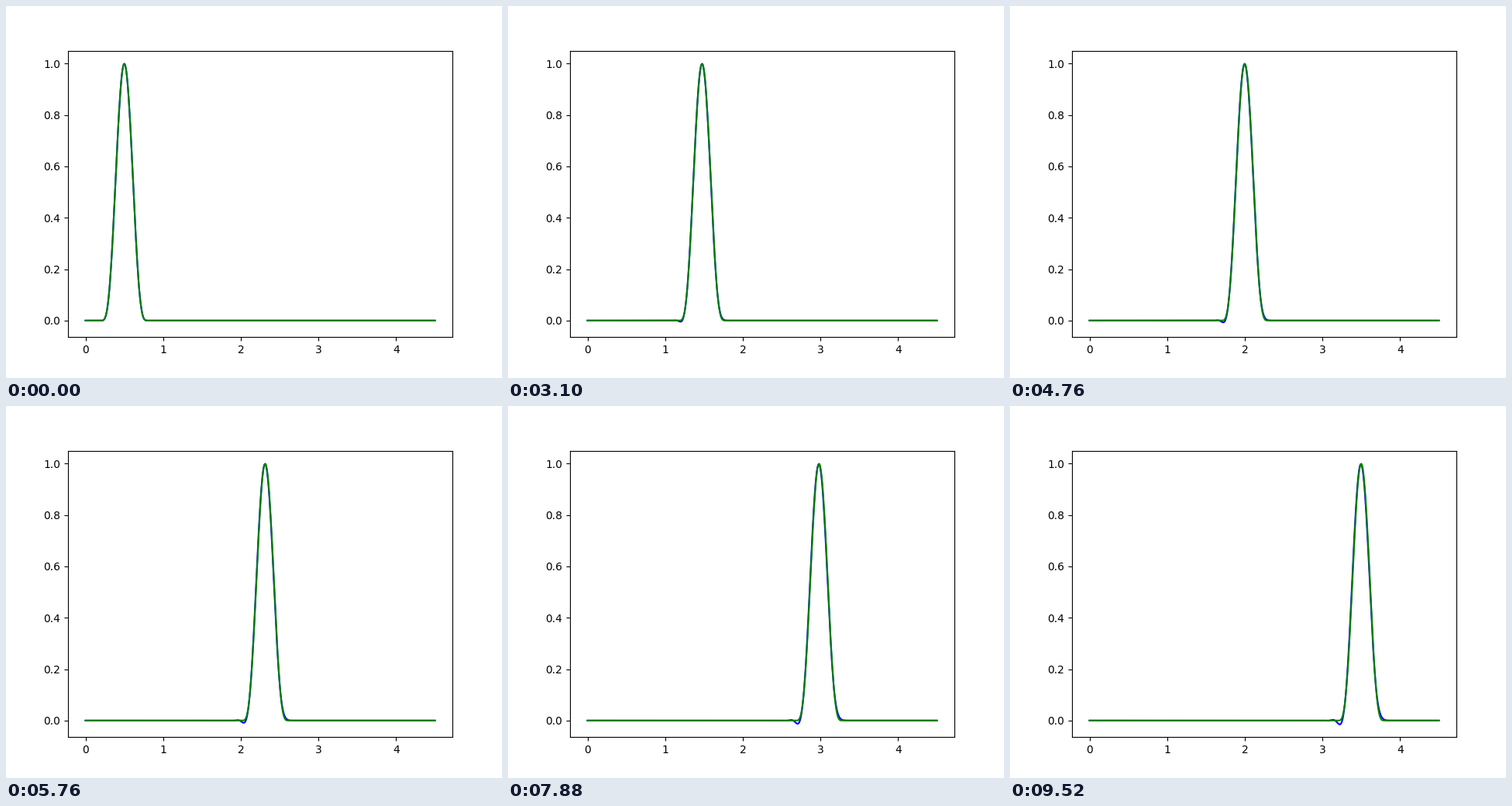
Recreate the animation shown at these times as a matplotlib script. Size 640 px wide and 480 px high, loop 9540 ms.

```python
import numpy as np
import matplotlib.pyplot as plt
from matplotlib.animation import FuncAnimation

LENGTH, CELLS = 4.5, 500
SPEED, CFL, T_END = 1.0, 0.7, 3.0

x = np.linspace(0, LENGTH, CELLS + 1)
dt = CFL * (x[1] - x[0]) / SPEED
steps = int(T_END / dt)


def bump(x):
    """Smooth pulse on [0.2, 0.8] with its peak of 1 at 0.5."""
    s = (x - 0.5) / 0.3
    return np.clip(1 - s**2, 0, None) ** 4


def lax_wendroff(u):
    new = u.copy()
    left, mid, right = u[:-2], u[1:-1], u[2:]
    new[1:-1] = (mid - CFL / 2 * (right - left)
                 + CFL**2 / 2 * (right - 2 * mid + left))
    return new


history = [bump(x)]
for _ in range(steps):
    history.append(lax_wendroff(history[-1]))

fig, ax = plt.subplots(figsize=(6.4, 4.8), dpi=100)
numeric, = ax.plot(x, history[0], "b")
exact, = ax.plot(x, history[0], "g")

low, high = -0.0138, 1.0
pad = 0.05 * (high - low)
ax.set_xlim(-0.05 * LENGTH, 1.05 * LENGTH)
ax.set_ylim(low - pad, high + pad)


def update(n):
    numeric.set_ydata(history[n])
    exact.set_ydata(bump(x - SPEED * n * dt))
    return numeric, exact


anim = FuncAnimation(fig, update, frames=len(history), interval=20,
                     repeat=True, repeat_delay=0, blit=False)
plt.show()
```
